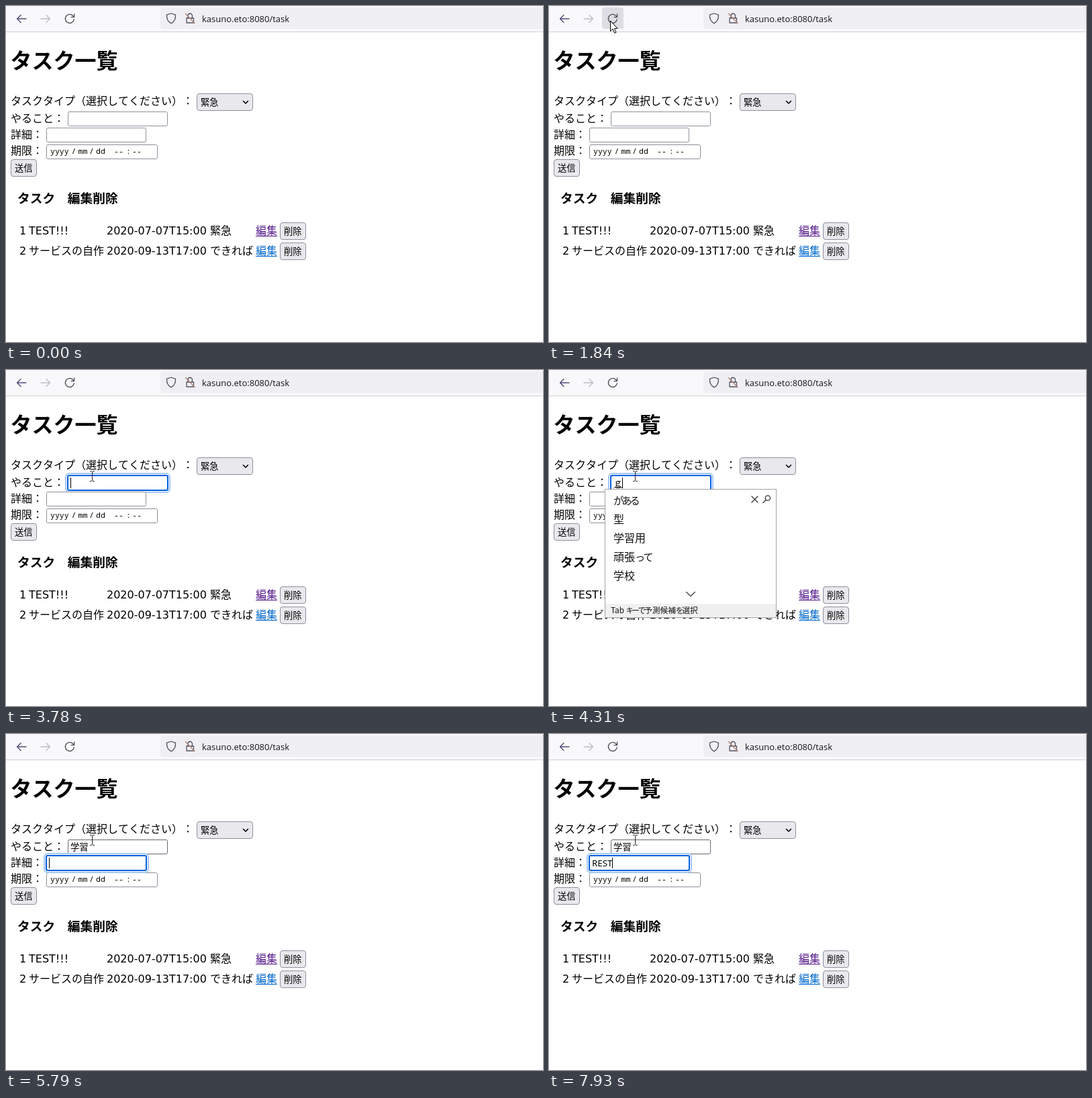
An HTML page with a canvas that plays this animation: 800x500 px, repeating every 8000 ms.

```html
<!DOCTYPE html>
<html lang="ja">
<head>
<meta charset="utf-8">
<title>タスク一覧</title>
<style>
html, body { margin: 0; width: 100%; height: 100%; overflow: hidden; background: #fff; }
canvas { display: block; width: 800px; height: 500px; }
</style>
</head>
<body>
<canvas id="stage" width="800" height="500"></canvas>
<script>
const ctx = document.getElementById('stage').getContext('2d');
const LOOP = 8000;
const PAGE = '"DejaVu Sans", "Noto Sans CJK JP", sans-serif';
const FIELD = '"Noto Sans", "Noto Sans CJK JP", sans-serif';
const MENU = '"Noto Sans CJK JP", sans-serif';
const MONO = '"Noto Sans Mono", monospace';
const BORDER = '#8f8f9d', HOVER = '#676774', ICON = '#53505f';
const TODO = { x: 92, y: 157, w: 149, h: 22 };
const DETAIL = { x: 60, y: 181, w: 149, h: 22 };
const DUE = { x: 60, y: 206, w: 166, h: 22 };

// What the input method shows, from each time on
const TYPED = [
  [4310, 'ｇ'], [4380, 'が'], [4510, 'がｋ'], [4710, 'がく'], [4840, 'がくｓ'],
  [4910, 'がくｓｙ'], [5040, 'がくしゅ'], [5110, 'がくしゅう'], [5240, '学習']
];
const WORD = [[6720, 'R'], [6860, 'RE'], [7130, 'RES'], [7200, 'REST']];
const EARLY = ['がある', '型', '学習用', '頑張って', '学校'];
const LATE = ['学習用', '学習', '学習対象', '学習指導要領', '学習院大学'];

const within = (t, a, b) => t >= a && t < b;
const latest = (list, t) => list.reduce((s, [at, v]) => t >= at ? v : s, '');

function text(s, x, y, size = 16, family = PAGE, color = '#000', weight = 400) {
  ctx.font = `${weight} ${size}px ${family}`;
  ctx.fillStyle = color;
  ctx.fillText(s, x, y);
  return ctx.measureText(s).width;
}

// Menu lettering sets kana tighter than kanji
function menuText(s, x, y, size) {
  for (const run of s.match(/[ぁ-ヿ]+|[^ぁ-ヿ]+/g)) {
    const kana = /[ぁ-ヿ]/.test(run);
    ctx.letterSpacing = kana ? `${-size * 0.18}px` : '0px';
    x += text(run, x, y, kana ? size * 0.95 : size, MENU, '#111', 350);
  }
  ctx.letterSpacing = '0px';
}

function rect(x, y, w, h, color) {
  ctx.fillStyle = color;
  ctx.fillRect(x, y, w, h);
}

function round(x, y, w, h, r, fill, stroke) {
  ctx.beginPath();
  const d = stroke ? 0.5 : 0;
  ctx.roundRect(x + d, y + d, w - 2 * d, h - 2 * d, r);
  ctx.fillStyle = fill;
  ctx.fill();
  if (!stroke) return;
  ctx.strokeStyle = stroke;
  ctx.lineWidth = 1;
  ctx.stroke();
}

function path(d, color, width = 1.4, fill) {
  const p = new Path2D(d);
  if (fill) {
    ctx.fillStyle = fill;
    ctx.fill(p);
  }
  ctx.strokeStyle = color;
  ctx.lineWidth = width;
  ctx.stroke(p);
}

function field(b, focused, border = BORDER) {
  if (!focused) return round(b.x, b.y, b.w, b.h, 2, '#fff', border);
  const layer = (e, r, c) => round(b.x - e, b.y - e, b.w + 2 * e, b.h + 2 * e, r, c);
  layer(4, 6, '#a6c7f3');
  layer(2, 4, '#fff');
  layer(1, 3, '#0060df');
  layer(-1, 1, '#fff');
}

function button(x, y, w, label) {
  round(x, y, w, 26, 3.5, '#e9e9ed', BORDER);
  text(label, x + 6, y + 17.5, 13.33);
}

function toolbar(mouse, pressed) {
  rect(0, 0, 800, 38, '#f9f9fb');
  rect(0, 38, 800, 1, '#cfcfd4');
  const over = mouse && within(mouse.x, 79, 111) && within(mouse.y, 2, 34);
  if (over) round(79, 2, 32, 32, 4, pressed ? '#cfcfd8' : '#dddde3');
  ctx.lineCap = ctx.lineJoin = 'round';
  path('M30 19H16.5M22 13.5L16.5 19L22 24.5', '#55497a');
  path('M52 19H65.5M60 13.5L65.5 19L60 24.5', '#bdbdc4');
  path('M101.3 20A6.5 6.5 0 1 1 99.6 14.4L101.3 16.2M101.6 12V16.6H97', ICON);
  round(230, 2, 590, 32, 4, '#f0f0f4');
  path('M246 11L252.5 13.2C252.8 19 250.5 23.5 246 25.8C241.5 23.5 239.2 19 239.5 13.2Z', ICON, 1.3);
  path('M269 18H279.5V25H269ZM271 18V14.5A3.2 3.2 0 0 1 277.5 14.5V18', ICON, 1.3);
  path('M267.5 11.5L281 25.5', '#b07f72', 1.3);
  text('kasuno.eto:8080/task', 292, 24, 13, '"Open Sans", sans-serif', '#15141a');
}

function row(y, cells, linkColor) {
  [20, 34, 150, 304].forEach((x, i) => text(cells[i], x, y));
  text('編集', 372, y, 16, PAGE, linkColor);
  rect(372, y + 2, 32, 1, linkColor);
  button(408, y - 18, 39, '削除');
}

function label(s, y) {
  text(s, 7, y);
  text('：', 7 + 16 * s.length, y);
}

function page(focus, hovered) {
  text('タスク一覧', 6.5, 93, 32, PAGE, '#000', 700);
  label('タスクタイプ（選択してください）', 147);
  button(284, 130, 84, '緊急');
  path('M353.5 141.5L357 145L360.5 141.5', '#000', 1.6);
  label('やること', 173);
  label('詳細', 197);
  label('期限', 221);
  field(DUE);
  const parts = [['yyyy', 66], ['/', 97.5], ['mm', 107.5], ['/', 124], ['dd', 134], ['--', 161], [':', 179], ['--', 188]];
  for (const [s, x] of parts) text(s, x, 220, 11.5, MONO);
  field(TODO, focus === TODO, hovered ? HOVER : BORDER);
  field(DETAIL, focus === DETAIL);
  button(7, 228, 39, '送信');
  text('タスク　編集削除', 17, 293, 18.72, PAGE, '#000', 700);
  row(340, ['1', 'TEST!!!', '2020-07-07T15:00', '緊急'], '#551a8b');
  row(370, ['2', 'サービスの自作', '2020-09-13T17:00', 'できれば'], '#0069cc');
}

function todoText(t) {
  const s = latest(TYPED, t);
  const w = s ? text(s, 96, 173, 13.33, FIELD) : 0;
  if (within(t, 4310, 5240)) {
    let wave = 'M97 175.5';
    for (let x = 99, i = 0; x < 96 + w; x += 2, i++) wave += `L${x} ${i % 2 ? 175.5 : 174}`;
    path(wave, '#000', 1);
  } else if (within(t, 5240, 5440)) {
    rect(97, 174, 25, 2, '#000');
  }
  if (within(t, 2720, 3250) || within(t, 3780, 5790)) rect(Math.round(96 + w), 160, 1, 16, '#000');
}

function detailText(t) {
  const s = latest(WORD, t);
  const w = s ? text(s, 64, 197, 13.33, FIELD) : 0;
  const off = within(t, 6320, 6720) || within(t, 7400, 7930);
  if (t >= 5790 && !off) rect(Math.round(64 + w), 184, 1, 16, '#000');
}

function candidates(list) {
  rect(83, 177, 256, 192, '#a3a3a3');
  rect(84, 178, 254, 190, '#fff');
  rect(84, 348, 254, 20, '#f0f0f0');
  list.forEach((s, i) => menuText(s, 96, 200 + 28 * i, 16));
  menuText('Tab キーで予測候補を選択', 92, 362, 11.8);
  path('M302 188L311 197M311 188L302 197', '#333', 1.3);
  path('M329.5 190.5A3.6 3.6 0 1 1 322.3 190.5A3.6 3.6 0 1 1 329.5 190.5M323.3 193.2L319 197.5', '#333', 1.3);
  path('M204.5 330.5L211 336.5L217.5 330.5', '#444', 1.4);
}

function history() {
  rect(60, 204, 149, 40, '#c4c4cb');
  rect(61, 205, 147, 38, '#fff');
  text('REST', 66, 229, 13.33, FIELD, '#15141a');
}

function mouseAt(t) {
  if (t < 790) return null;
  if (t < 1970) {
    const n = Math.min(11, Math.floor((t - 790) / 70.9));
    const u = 1 - (1 - n / 11) ** 1.6, v = 1 - u;
    return {
      x: 430 * v * v - 100 * u * v + 91 * u * u,
      y: 478 * v * v + 300 * u * v + 22 * u * u
    };
  }
  const p = Math.min(1, (Math.floor((t - 1970) / 80) + 1) / 7);
  const e = p * p * (3 - 2 * p);
  return { x: 91 + 37 * e, y: 22 + 136 * e, beam: true };
}

function pointer(m, clicked) {
  const x = Math.round(m.x), y = Math.round(m.y);
  if (clicked) {
    ctx.beginPath();
    ctx.arc(x - 1.5, y - 1, 11.5, 0, 2 * Math.PI);
    ctx.fillStyle = 'rgba(250,232,50,.72)';
    ctx.fill();
  }
  ctx.save();
  ctx.translate(x, y);
  const overText = m.beam && (within(y, 62, 100) || y > 132);
  if (overText) path('M-2.5 -7.5H-.5L.5 -6.5L1.5 -7.5H3.5M.5 -6.5V6.5M-2.5 7.5H-.5L.5 6.5L1.5 7.5H3.5', '#222', 1);
  else path('M.5 .5V15.5L4 12.2L6.7 18.2L9 17.2L6.4 11.4H10.7Z', '#000', 1, '#fff');
  ctx.restore();
}

function draw(t) {
  rect(0, 0, 800, 500, '#fff');
  const mouse = mouseAt(t);
  const clickReload = within(t, 1710, 1780);
  toolbar(mouse, clickReload);
  page(t >= 5790 ? DETAIL : t >= 2720 ? TODO : null, t >= 2520);
  todoText(t);
  detailText(t);
  if (within(t, 4310, 5240)) candidates(t < 4710 ? EARLY : LATE);
  if (within(t, 6790, 7930)) history();
  if (mouse) pointer(mouse, clickReload || within(t, 2720, 2790));
}

const start = performance.now();
function tick() {
  draw((performance.now() - start) % LOOP);
  requestAnimationFrame(tick);
}
tick();
</script>
</body>
</html>
```
